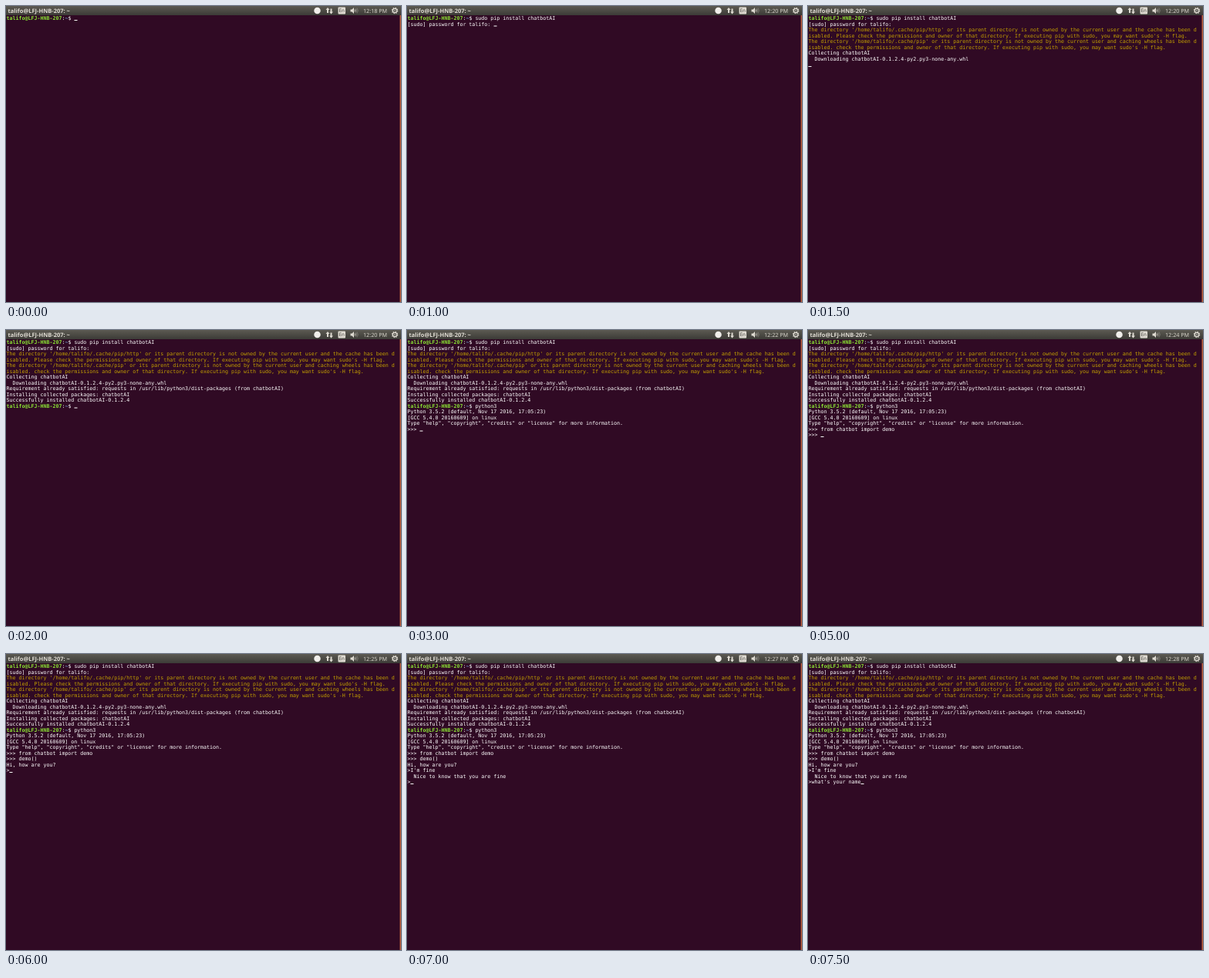
Write an HTML page that moves like this. It is 512 px wide and 384 px high and loops after 8000 ms.

```html
<!DOCTYPE html>
<html lang="en">
<head>
<meta charset="utf-8">
<title>Terminal session</title>
<style>
  html, body { margin: 0; width: 100%; height: 100%; overflow: hidden; background: #300a24; }
  /* Laid out at double size, shown at half */
  #screen {
    position: absolute; left: 0; top: 0; width: 1024px; height: 768px; overflow: hidden;
    transform: scale(.5); transform-origin: 0 0;
    background: #300a24; text-rendering: geometricPrecision;
  }
  #bar { position: absolute; left: 0; top: 0; width: 1024px; height: 24px; }
  #bar text { font-family: "Open Sans", "Noto Sans", sans-serif; fill: #dfdbd2; }
  #edge { position: absolute; left: 1021px; top: 24px; width: 3px; height: 744px; background: #b9603f; }
  #term {
    position: absolute; left: 1px; top: 25px; margin: 0; color: #fff;
    font: 13.288px/15px "DejaVu Sans Mono", "Liberation Mono", monospace;
  }
  #term div { height: 15px; white-space: pre; }
  .user { color: #8ae234; font-weight: bold; }
  .path { color: #729fcf; font-weight: bold; }
  .warn { color: #c4a000; }
  .cursor { display: inline-block; width: 8px; height: 2px; background: #fff; vertical-align: -2px; }
</style>
</head>
<body>
<div id="screen">
  <svg id="bar" viewBox="0 0 1024 24">
    <defs>
      <linearGradient id="shade" x2="0" y2="1">
        <stop offset="0" stop-color="#5c5a52"/>
        <stop offset="1" stop-color="#3c3b37"/>
      </linearGradient>
    </defs>
    <rect width="1024" height="24" fill="url(#shade)"/>
    <text id="title" x="5" y="17" font-size="15" font-weight="700"></text>
    <circle cx="807" cy="12" r="8.5" fill="#f0eeea"/>
    <g fill="#dfdbd2">
      <path d="M834 4l5 6h-3v8h-4v-8h-3z"/>
      <path d="M843 21l5-6h-3v-8h-4v8h-3z"/>
      <rect x="861" y="3" width="19" height="18" rx="2"/>
      <path d="M893 9h4l5-5v16l-5-5h-4z"/>
    </g>
    <text x="870.5" y="16.5" font-size="12.5" text-anchor="middle" style="fill:#3c3b37">En</text>
    <g fill="none" stroke="#dfdbd2" stroke-width="1.6">
      <path d="M904 9q2.5 3 0 6"/>
      <path d="M907 7q4 5 0 10" opacity=".6"/>
      <path d="M910 5q5.5 7 0 14" opacity=".35"/>
    </g>
    <text id="clock" x="926" y="17" font-size="14.4"></text>
    <g fill="none" stroke="#dfdbd2">
      <circle cx="1008" cy="12" r="5.3" stroke-width="2.4"/>
      <circle cx="1008" cy="12" r="7.2" stroke-width="2.6" stroke-dasharray="2.8 2.855"/>
      <circle cx="1008" cy="12" r="1" stroke-width="1.6"/>
    </g>
  </svg>
  <div id="term"></div>
  <div id="edge"></div>
</div>
<script>
const USER = "talifo", HOST = "LFJ-HNB-207";
const byId = id => document.getElementById(id);

// A row is a list of [text, class] lead parts followed by its body text
const shell = body => ({ lead: [[`${USER}@${HOST}`, "user"], [":"], ["~", "path"], ["$ "]], body });
const ask = (prompt, body = "") => ({ lead: [[prompt]], body });
const out = body => ({ lead: [], body });
const warn = body => ({ lead: [], body, style: "warn" });

const rows = [
  shell("sudo pip install chatbotAI"),
  ask(`[sudo] password for ${USER}: `),
  warn(`The directory '/home/${USER}/.cache/pip/http' or its parent directory is not owned by the current user and the cache has been d`),
  warn("isabled. Please check the permissions and owner of that directory. If executing pip with sudo, you may want sudo's -H flag."),
  warn(`The directory '/home/${USER}/.cache/pip' or its parent directory is not owned by the current user and caching wheels has been d`),
  warn("isabled. check the permissions and owner of that directory. If executing pip with sudo, you may want sudo's -H flag."),
  out("Collecting chatbotAI"),
  out("  Downloading chatbotAI-0.1.2.4-py2.py3-none-any.whl"),
  out("Requirement already satisfied: requests in /usr/lib/python3/dist-packages (from chatbotAI)"),
  out("Installing collected packages: chatbotAI"),
  out("Successfully installed chatbotAI-0.1.2.4"),
  shell("python3"),
  out("Python 3.5.2 (default, Nov 17 2016, 17:05:23) "),
  out("[GCC 5.4.0 20160609] on linux"),
  out('Type "help", "copyright", "credits" or "license" for more information.'),
  ask(">>> ", "from chatbot import demo"),
  ask(">>> ", "demo()"),
  out("Hi, how are you?"),
  ask(">", "I'm fine"),
  out("  Nice to know that you are fine"),
  ask(">", "what's your name")
];

// Every half second: [minute past twelve, cursor row, characters typed there]
const STEP = 500;
const steps = [
  [18, 0, 0], [19, 0, 16], [20, 1, 0], [20, 8, 0],
  [20, 11, 0], [21, 11, 7], [22, 15, 0], [22, 15, 8],
  [23, 15, 19], [23, 15, 24], [24, 16, 0], [24, 16, 6],
  [25, 18, 0], [26, 18, 8], [27, 20, 0], [28, 20, 16]
];

function addSpan(line, text, style) {
  const span = document.createElement("span");
  span.textContent = text;
  if (style) span.className = style;
  line.append(span);
}

function drawRow(row, typed) {
  const line = document.createElement("div");
  row.lead.forEach(([text, style]) => addSpan(line, text, style));
  addSpan(line, row.body.slice(0, typed), row.style);
  return line;
}

function show([minute, last, typed]) {
  const lines = rows.slice(0, last + 1).map((row, i) => drawRow(row, i < last ? undefined : typed));
  addSpan(lines[last], "", "cursor");
  byId("term").replaceChildren(...lines);
  byId("clock").textContent = `12:${minute} PM`;
}

byId("title").textContent = `${USER}@${HOST}: ~`;

const start = performance.now();
let current = -1;
function tick() {
  const index = Math.floor((performance.now() - start) / STEP) % steps.length;
  if (index !== current) show(steps[current = index]);
  requestAnimationFrame(tick);
}
tick();
</script>
</body>
</html>
```
